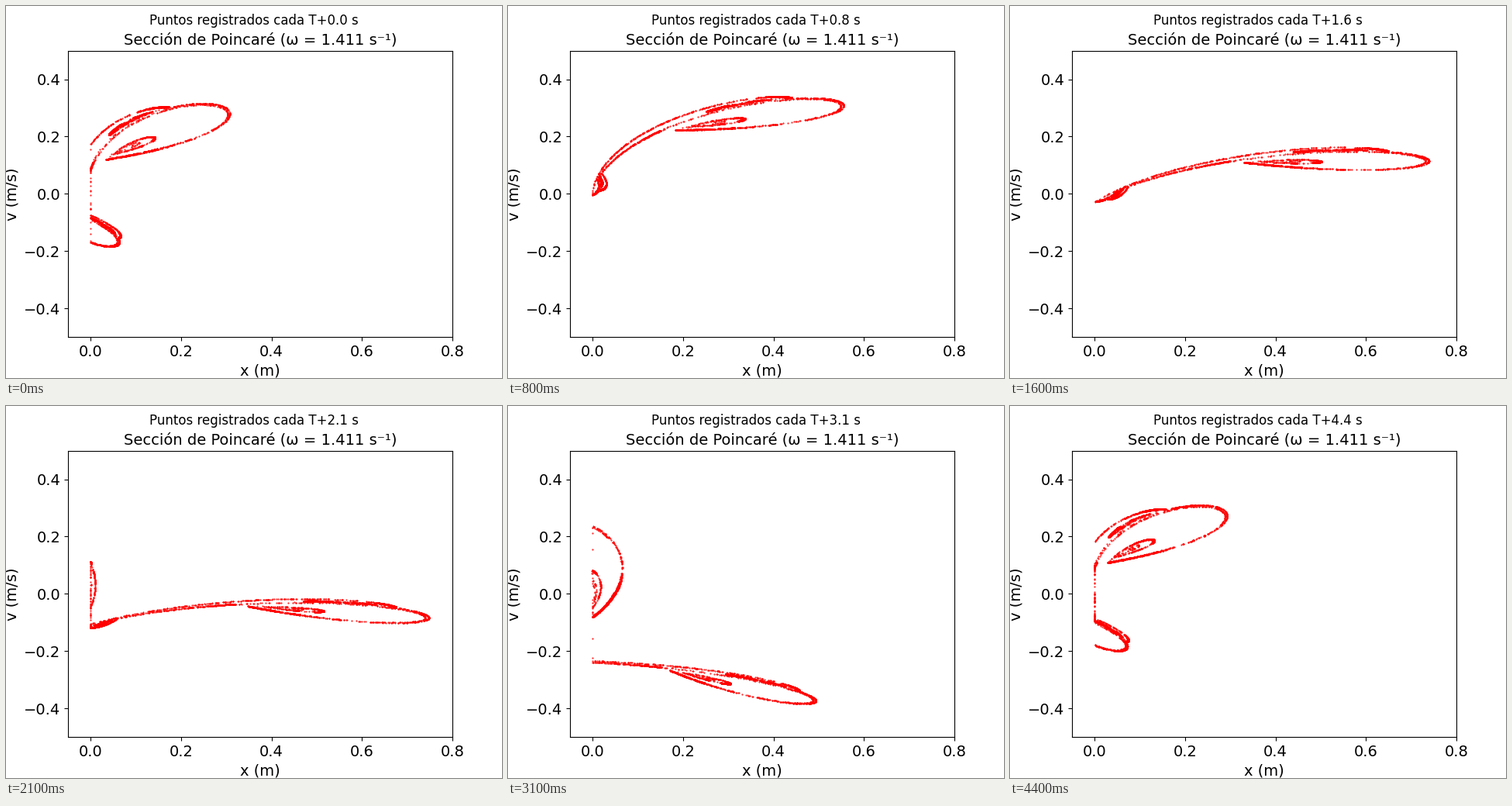
Animation, 640 px wide and 480 px high, one loop 4500 ms. Source, as a matplotlib script:

```python
import numpy as np
import matplotlib.pyplot as plt
from matplotlib.animation import FuncAnimation

# Driven, damped oscillator bouncing on a stiff elastic stop at x = 0
OMEGA = 1.411              # drive frequency, 1/s
K, C, A = 0.25, 0.25, 0.25  # spring, damping and drive per unit mass
WALL = np.sqrt(2.5e4)      # contact frequency of the stop, 1/s
PERIOD = 2 * np.pi / OMEGA

POINTS = 4000
WARMUP = 20                # periods before recording
FRAMES = 45
DT = 0.1                   # s between frames
SUB = 8                    # integration steps per frame


def glide(x, v, h):
    """Free flight for a time h, with exact contact against the stop."""
    outside = x > 0
    hit = outside & (x + v * h < 0)
    free = outside & ~hit
    x[free] += v[free] * h

    left = np.full_like(x, h)
    left[hit] += x[hit] / v[hit]
    x[hit] = 0

    m = ~free
    if m.any():
        amp = np.hypot(x[m], v[m] / WALL)
        phase = np.arctan2(WALL * np.abs(x[m]), -v[m]) + WALL * left[m]
        spare = np.maximum(phase - np.pi, 0) / WALL
        phase = np.minimum(phase, np.pi)
        v[m] = -amp * WALL * np.cos(phase)
        x[m] = -amp * np.sin(phase) + v[m] * spare


def advance(x, v, t, span, steps):
    """Integrate all points in place from t to t + span."""
    h = span / steps
    damp = np.exp(-C * h / 2)
    for i in range(steps):
        v += h / 2 * (A * np.cos(OMEGA * (t + i * h)) - K * x)
        v *= damp
        glide(x, v, h)
        v *= damp
        v += h / 2 * (A * np.cos(OMEGA * (t + (i + 1) * h)) - K * x)


def record():
    rng = np.random.default_rng(4)
    x = rng.uniform(0.15, 0.25, POINTS)
    v = rng.uniform(0.25, 0.32, POINTS)
    last = (FRAMES - 1) * DT
    for _ in range(WARMUP):
        advance(x, v, 0, last, (FRAMES - 1) * SUB)
        advance(x, v, last, PERIOD - last, SUB // 2)
    shots = [(x.copy(), v.copy())]
    for n in range(FRAMES - 1):
        advance(x, v, n * DT, DT, SUB)
        shots.append((x.copy(), v.copy()))
    return shots


sections = record()

plt.rcParams.update({"font.family": "DejaVu Sans", "font.size": 14})
fig, ax = plt.subplots(figsize=(6.4, 4.8), dpi=100)
ax.set(xlim=(-0.05, 0.8), ylim=(-0.5, 0.5),
       xticks=np.arange(0, 0.9, 0.2), yticks=np.arange(-0.4, 0.5, 0.2))
ax.set_xlabel("x (m)", fontsize=14)
ax.set_ylabel("v (m/s)", fontsize=14)
ax.set_title(f"Sección de Poincaré (ω = {OMEGA} s⁻¹)", fontsize=14)
head = fig.suptitle("", fontsize=12)
dots, = ax.plot([], [], "r.", markersize=1)


def update(n):
    dots.set_data(*sections[n])
    head.set_text(f"Puntos registrados cada T+{n * DT:.1f} s")
    return dots, head


anim = FuncAnimation(fig, update, frames=FRAMES, interval=100,
                     repeat=True, repeat_delay=0, blit=False)
plt.show()
```
